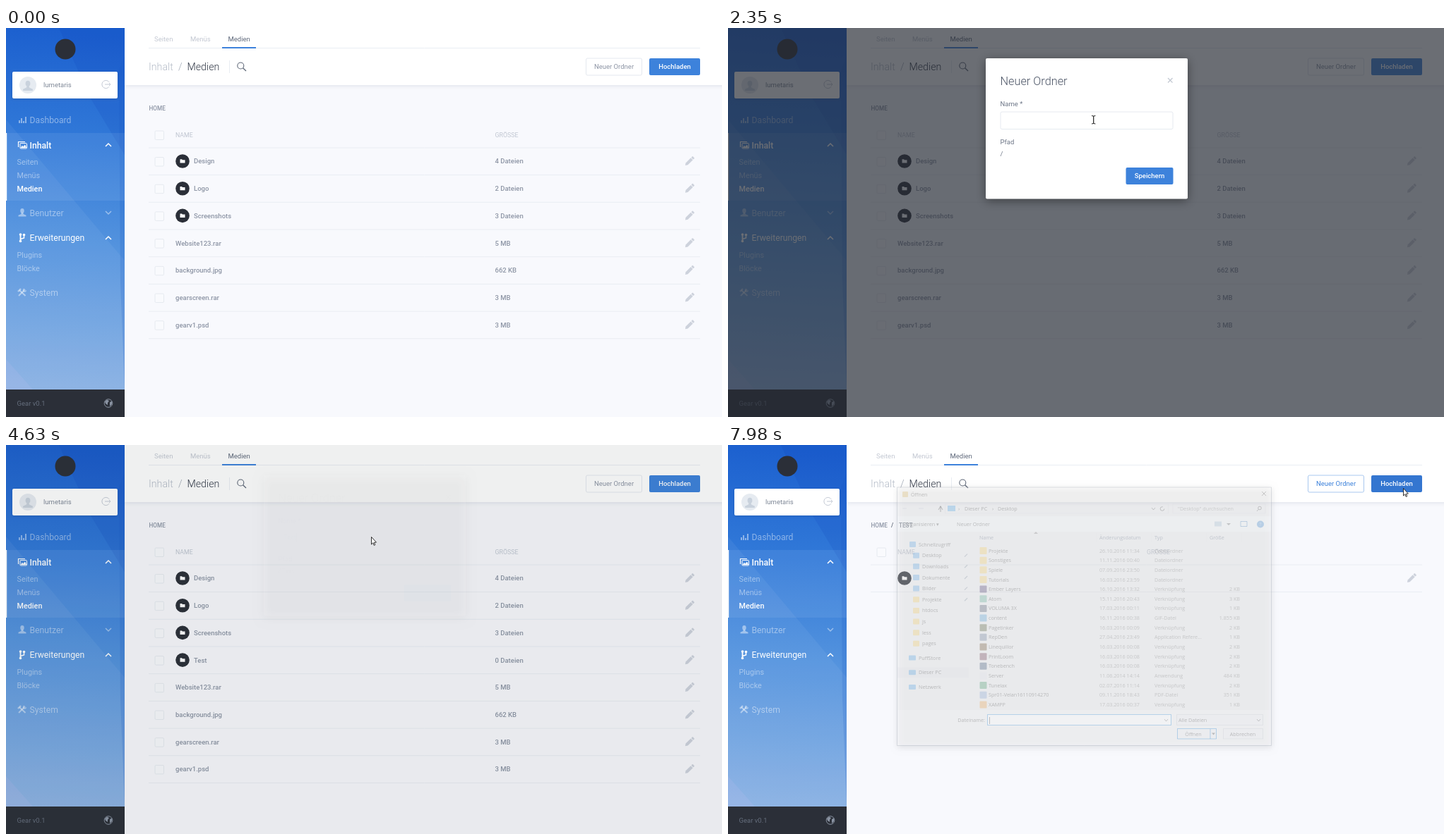
These frames come from a looping animation (1014x552 px, 8 s). An HTML page with a canvas:

```html
<!DOCTYPE html>
<html lang="de">
<head>
<meta charset="utf-8">
<title>Medien</title>
<style>
html, body { margin: 0; width: 100%; height: 100%; overflow: hidden; background: #f8f9fd; }
canvas { display: block; width: 1014px; height: 552px; }
</style>
</head>
<body>
<canvas id="stage"></canvas>
<script>
const W = 1014, H = 552, LOOP = 8000;
const BLUE = '#3d82db', DARK = '#2b2f38', GREY = '#8d95a5', LINE = '#e9edf3', PALE = '#c4cad5';
const canvas = document.getElementById('stage');
const dpr = window.devicePixelRatio || 1;
canvas.width = W * dpr;
canvas.height = H * dpr;
const c = canvas.getContext('2d');

const clamp = v => Math.max(0, Math.min(1, v));
const smooth = u => u * u * (3 - 2 * u);
const quadOut = u => 1 - (1 - u) ** 2;
const cubicOut = u => 1 - (1 - u) ** 3;
const span = (t, a, b) => clamp((t - a) / (b - a));

const STRETCHES = [[140, 780, 9], [1010, 1640, 9], [4470, 4720, 4], [5030, 5410, 6],
  [5570, 6340, 11], [6820, 7590, 11], [7820, 7980, 3]];

function snap(t) {
  let q = 0;
  for (const [a, b, n] of STRETCHES) {
    if (t < a) break;
    const step = (b - a) / (n - 1);
    q = a + Math.min(n - 1, Math.floor((t - a) / step + 0.15)) * step;
  }
  return q;
}

function text(s, x, cy, size, color, weight = 400, align = 'left', font = 'Roboto') {
  c.font = `${weight} ${size}px ${font}, sans-serif`;
  c.textAlign = align;
  c.fillStyle = color;
  c.fillText(s, x, cy + size * 0.36);
}

function box(x, y, w, h, fill, stroke, r = 0) {
  c.beginPath();
  c.roundRect(x, y, w, h, r);
  if (fill) { c.fillStyle = fill; c.fill(); }
  if (stroke) { c.strokeStyle = stroke; c.lineWidth = 1; c.stroke(); }
}

function disc(x, y, r, fill) {
  c.beginPath();
  c.arc(x, y, r, 0, 7);
  c.fillStyle = fill;
  c.fill();
}

function ring(x, y, r, color, width = 1, from = 0, to = 2 * Math.PI) {
  c.beginPath();
  c.arc(x, y, r, from, to);
  c.strokeStyle = color;
  c.lineWidth = width;
  c.stroke();
}

function trace(points) {
  c.beginPath();
  points.forEach(([x, y]) => c.lineTo(x, y));
}

function line(color, width, ...points) {
  trace(points);
  c.strokeStyle = color;
  c.lineWidth = width;
  c.stroke();
}

function poly(color, ...points) {
  trace(points);
  c.fillStyle = color;
  c.fill();
}

function shadowed(color, blur, dy, draw) {
  c.save();
  c.shadowColor = color;
  c.shadowBlur = blur * dpr;
  c.shadowOffsetY = dy * dpr;
  draw();
  c.restore();
}

function person(x, y, k, color) {
  c.beginPath();
  c.ellipse(x, y - 2.6 * k, 2.7 * k, 3.3 * k, 0, 0, 7);
  c.fillStyle = color;
  c.fill();
  poly(color, [x - 1.3 * k, y], [x + 1.3 * k, y], [x + 1.6 * k, y + 2 * k], [x + 5.5 * k, y + 3.8 * k],
    [x + 5.5 * k, y + 5.5 * k], [x - 5.5 * k, y + 5.5 * k], [x - 5.5 * k, y + 3.8 * k], [x - 1.6 * k, y + 2 * k]);
}

function chevron(y, dir, color) {
  line(color, 1.5, [141, y - 2 * dir], [145, y + 2 * dir], [149, y - 2 * dir]);
}

function sidebar() {
  const g = c.createLinearGradient(30, 0, 0, 513);
  g.addColorStop(0, '#1c60cf');
  g.addColorStop(0.3, '#3179d8');
  g.addColorStop(0.6, '#5594de');
  g.addColorStop(1, '#8ab1e2');
  box(0, 0, 168, H, g);
  poly('rgba(15,60,175,.13)', [75, 0], [168, 0], [168, 180], [120, 100]);
  poly('rgba(255,255,255,.05)', [0, 130], [168, 330], [168, 513], [0, 513]);
  poly('rgba(190,190,235,.18)', [0, 470], [38, 513], [0, 513]);
  poly('rgba(25,85,195,.18)', [160, 60], [168, 40], [168, 513], [162, 360]);
  box(0, 149, 168, 96, 'rgba(255,255,255,.07)');
  box(0, 149, 1.2, 96, '#fff');
  disc(84, 30, 14.5, DARK);

  shadowed('rgba(20,50,110,.25)', 4, 1, () => box(9, 62, 149, 38, '#fff', null, 2));
  disc(31, 81, 12, '#e6ebf1');
  person(31, 82, 1.25, '#c9d2dd');
  text('lumetaris', 53, 80.5, 9.5, '#7e8796');
  ring(141.5, 80, 5.6, PALE, 1, 0.6, 5.7);
  line(PALE, 1, [140, 80], [148, 80]);
  line(PALE, 1, [146, 78], [148, 80], [146, 82]);

  const dim = 'rgba(255,255,255,.46)', white = '#fff';
  [[18, 4], [21, 7], [24, 3], [27, 9]].forEach(([x, h]) => box(x, 135 - h, 2, h, dim));
  text('Dashboard', 33.5, 131, 12.2, dim);

  line(white, 1.2, [17.5, 169], [17.5, 161.5], [27, 161.5]);
  box(20, 163.5, 9.5, 7.5, null, white, 1);
  poly(white, [20.5, 170], [23, 167], [24.5, 168.5], [27, 165.5], [29, 170]);
  text('Inhalt', 33.5, 166.5, 12.2, white, 500);
  chevron(166, -1, white);
  text('Seiten', 15.5, 190, 10.8, dim);
  text('Menüs', 15.5, 209, 10.8, dim);
  text('Medien', 15.5, 228, 10.8, white, 500);

  person(23, 262, 1, dim);
  text('Benutzer', 33.5, 262.5, 12.2, dim);
  chevron(262, 1, dim);

  line(white, 1.8, [20.5, 293], [20.5, 303]);
  line(white, 1.5, [20.5, 299.5], [25.5, 298], [25.5, 294]);
  disc(20.5, 293, 1.8, white);
  disc(20.5, 302.5, 1.8, white);
  disc(25.5, 293.5, 1.8, white);
  text('Erweiterungen', 33.5, 298, 12.2, white);
  chevron(298, -1, white);
  text('Plugins', 15.5, 322, 10.8, dim);
  text('Blöcke', 15.5, 341, 10.8, dim);

  line(dim, 2, [18, 380], [27, 371]);
  line(dim, 2, [19, 372], [27.5, 380]);
  line(dim, 2.4, [17, 374], [21, 370]);
  ring(26.5, 372, 2, dim, 1.4, 0.2, 4.4);
  text('System', 33.5, 375.5, 12.2, dim);

  box(0, 513, 168, 39, DARK);
  text('Gear v0.1', 15.5, 533, 9.5, '#656e7d');
  ring(145, 532.5, 5.8, '#8a93a2', 1);
  poly('#8a93a2', [140, 530], [143, 527.5], [146, 529], [144, 532], [144, 535], [141, 533]);
  poly('#8a93a2', [147, 531], [150, 529.5], [150, 534], [147, 537]);
}

function button(label, x, w, y, fill, stroke, color, weight) {
  box(x, y, w, 24, fill, stroke, 2);
  text(label, x + w / 2, y + 11.8, 9.5, color, weight, 'center');
}

function header(t) {
  shadowed('rgba(40,60,100,.13)', 6, 1, () => box(168, -10, 860, 91, '#fff'));
  text('Seiten', 210, 15.5, 9.5, '#c3c8d2');
  text('Menüs', 261, 15.5, 9.5, '#c3c8d2');
  text('Medien', 314.5, 15.5, 9.5, '#606a7c');
  line(LINE, 1, [202, 28.5], [983, 28.5]);
  box(306, 27, 48, 2, BLUE);
  text('Inhalt', 202, 55, 14.2, '#b5bcc8', 300);
  text('/', 244, 55, 14.2, '#a0a8b5', 300);
  text('Medien', 256.5, 55, 14.2, '#333a48', 300);
  line(LINE, 1, [316.5, 46], [316.5, 64]);
  ring(332.3, 53.5, 4.5, '#5f6878', 1.1);
  line('#5f6878', 1.3, [335.6, 56.8], [340, 61]);
  const hot = (t >= 700 && t < 1010) || t >= 7510;
  button('Neuer Ordner', 821.5, 79, 43, '#fff', hot ? '#a9c8ef' : '#e4e8ef', hot ? BLUE : GREY, 400);
  button('Hochladen', 911, 72, 43, t >= 7590 ? '#3476d0' : BLUE, null, '#fff', 500);
}

function checkbox(y) {
  box(211, y - 6, 12.5, 12.5, '#f9fafd', '#e6eaf0', 1.5);
}

function folder(y) {
  disc(250, y, 9.8, DARK);
  poly('#fff', [246.5, y - 2.8], [249, y - 2.8], [250, y - 1.8], [253.5, y - 1.8], [253.5, y + 2.6], [246.5, y + 2.6]);
}

function pencil(y) {
  c.save();
  c.translate(968, y);
  c.rotate(-Math.PI / 4);
  poly('#cdd2dc', [-8.6, 0], [-5.5, -2.1], [4.6, -2.1], [4.6, 2.1], [-5.5, 2.1]);
  box(5.4, -2.1, 2.8, 4.2, '#cdd2dc', null, 1);
  c.restore();
}

const FOLDERS = [['Design', '4 Dateien'], ['Logo', '2 Dateien'], ['Screenshots', '3 Dateien']];
const FILES = [['Website123.rar', '5 MB'], ['background.jpg', '662 KB'], ['gearscreen.rar', '3 MB'], ['gearv1.psd', '3 MB']];

function table(t) {
  const inside = t >= 6570;
  text('HOME', 202.5, 114, 8.2, GREY, 500);
  if (inside) {
    text('/', 231, 114, 8.2, '#555e6e', 500);
    text('TEST', 242, 114, 8.2, '#555e6e', 500);
  }
  checkbox(152);
  text('NAME', 240, 152, 8.8, '#c0c6d1');
  text('GRÖSSE', inside ? 593 : 692.5, 152, 8.8, '#c0c6d1');
  line(LINE, 1, [202, 170], [983, 170]);
  const dirs = t >= 4470 ? [...FOLDERS, ['Test', '0 Dateien']] : FOLDERS;
  const rows = inside ? [['', '']] : [...dirs, ...FILES];
  rows.forEach(([name, size], i) => {
    const y = 189 + i * 38.7;
    const isDir = inside || i < dirs.length;
    if (!inside) checkbox(y + 0.5);
    if (isDir) folder(y);
    text(name, isDir ? 266 : 240, y, 9.5, GREY, 500);
    text(size, 692.5, y, 9.5, GREY, 500);
    pencil(y);
    line(LINE, 1, [202, y + 19.6], [983, y + 19.6]);
  });
}

function notice(q) {
  const shown = cubicOut(span(q, 4990, 5410)) * (1 - smooth(span(q, 7050, 7400)));
  if (!shown) return;
  c.save();
  c.globalAlpha = shown;
  c.translate(0, -21 * (1 - shown));
  box(545.5, 43, 94.5, 24, '#43d854', null, 2);
  text('Ordner hinzugefügt', 592.7, 54.8, 9.5, '#fff', 500, 'center');
  c.restore();
}

const TYPED = [2900, 3050, 3230, 3450];

function modal(t, q) {
  if (q < 1010 || q >= 4710) return;
  const opened = span(q, 1010, 1350);
  const open = cubicOut(opened);
  const left = 1 - smooth(span(q, 4425, 4690));
  c.save();
  c.globalAlpha = 0.68 * quadOut(opened) * left;
  box(0, 0, W, H, '#262a33');
  c.globalAlpha = Math.min(1, open * 1.15) * left;
  c.translate(0, -20 * (1 - open));
  shadowed('rgba(0,0,0,.4)', 14, 3, () => box(365, 43, 286, 199.5, '#fff', null, 2));
  c.globalAlpha *= open * (left < 0.5 ? left : 1);
  text('Neuer Ordner', 385.5, 75.5, 16.3, '#4d5667', 300);
  line('#c3c9d3', 1.2, [623, 71], [629.5, 77.5]);
  line('#c3c9d3', 1.2, [629.5, 71], [623, 77.5]);
  text('Name *', 385.5, 107.5, 9.5, '#6d7687');
  box(386, 119, 244, 24.5, '#fff', '#e6eaf0', 2);
  text('Pfad', 385.5, 161.5, 9.5, '#6d7687');
  text('/', 385.5, 179, 9.5, '#6d7687');
  button('Speichern', 563.5, 67, 198, BLUE, null, '#fff', 500);

  const word = 'Test'.slice(0, TYPED.filter(at => t >= at).length);
  text(word, 390, 179, 9.5, '#c3c9d3');
  text(word, 393, 131, 9.5, '#7b8494');
  const end = 393.5 + c.measureText(word).width;
  const caret = (t >= 1810 && t < 2350) || (t >= 2900 && t < 4000) || t >= 4470;
  if (caret) line('#3a4150', 1, [end, 125], [end, 137]);
  c.restore();
}

const PLACES = ['Schnellzugriff', 'Desktop', 'Downloads', 'Dokumente', 'Bilder', 'Projekte', 'htdocs', 'js', 'less', 'pages'];
const DRIVES = ['PuffStore', 'Dieser PC', 'Netzwerk'];
const LINK = 'Verknüpfung', DIR = 'Dateiordner', SAND = '#f3cc55';
const ENTRIES = [
  ['Projekte', '26.10.2016 11:34', DIR, '', SAND],
  ['Sonstiges', '11.11.2016 00:40', DIR, '', SAND],
  ['Spiele', '07.09.2016 23:50', DIR, '', SAND],
  ['Tutorials', '16.03.2016 23:59', DIR, '', SAND],
  ['Ember Layers', '16.10.2016 13:32', LINK, '2 KB', '#33265e'],
  ['Atom', '15.11.2016 20:43', LINK, '3 KB', '#4fa587'],
  ['VOLUMA 3X', '17.03.2016 00:11', LINK, '1 KB', '#38465e'],
  ['content', '16.11.2016 00:38', 'GIF-Datei', '1.855 KB', '#3e97cf'],
  ['Pagetinker', '16.03.2016 00:09', LINK, '2 KB', '#3b4a1c'],
  ['RepDen', '27.04.2016 23:49', 'Application Refere...', '1 KB', '#58708c'],
  ['Linequillor', '16.03.2016 00:08', LINK, '2 KB', '#573b12'],
  ['PrintLoom', '16.03.2016 00:08', LINK, '2 KB', '#582238'],
  ['Tonebench', '16.03.2016 00:08', LINK, '2 KB', '#1c3f62'],
  ['Server', '11.06.2014 14:14', 'Anwendung', '484 KB', '#dfe3e8'],
  ['Tunelax', '02.07.2016 11:14', LINK, '2 KB', '#2f8f57'],
  ['Spr01-Velan16110914270', '09.11.2016 18:43', 'PDF-Datei', '351 KB', '#7b9fd0'],
  ['XAMPP', '17.03.2016 00:37', LINK, '1 KB', '#e79a3c']];

function filePicker(t, q) {
  if (t < 7820) return;
  const grow = span(q, 7740, 7980);
  const label = (s, x, y, color = '#333', align = 'left') => text(s, x, y, 7.2, color, 400, align, '"Open Sans"');
  c.save();
  c.globalAlpha = 0.27 * grow;
  c.translate(504.5, 243.5);
  c.scale(0.95 + 0.05 * grow, 0.95 + 0.05 * grow);
  c.translate(-504.5, -243.5);
  shadowed('rgba(0,0,0,.35)', 9, 2, () => box(239.5, 60, 530, 366.5, '#fff', '#8d98a6'));
  box(247, 66, 8, 8, '#d9b45c', null, 1);
  label('Öffnen', 259, 70);
  line('#555', 1, [756, 66], [762, 72]);
  line('#555', 1, [762, 66], [756, 72]);
  line('#b8bec7', 1, [253, 90], [247, 90]);
  line('#b8bec7', 1, [270, 90], [277, 90]);
  line('#555', 1.2, [298, 92], [301, 87], [304, 92]);
  line('#555', 1.2, [301, 87], [301, 95]);
  box(307.5, 83.5, 316, 13.5, null, '#d5d9df');
  box(311, 86, 11, 8, '#3d9be0');
  label('›', 326, 90);
  label('Dieser PC', 335, 90);
  label('›', 374, 90);
  label('Desktop', 382, 90);
  line('#555', 1, [600, 89], [602.5, 92], [605, 89]);
  ring(615, 90.5, 2.8, '#555', 1, 0, 5);
  box(630, 83.5, 131, 13.5, null, '#d5d9df');
  label('"Desktop" durchsuchen', 637, 90, '#777');
  ring(753, 89.5, 2.3, '#555');
  line('#555', 1, [751, 91.5], [749, 94]);
  box(240, 101, 529, 22, '#f5f6f9');
  label('Organisieren ▾', 250, 112);
  label('Neuer Ordner', 324, 112);
  box(689, 108.5, 10, 7, '#9db5cc');
  poly('#555', [706, 111], [712, 111], [709, 114]);
  box(726, 108.5, 9, 7, null, '#4479b5');
  disc(754, 112.5, 5, '#2a7ac9');
  text('?', 754, 112.5, 7, '#fff', 700, 'center');
  [['Name', 356], ['Änderungsdatum', 526], ['Typ', 604], ['Größe', 682]].forEach(([s, x]) => label(s, x, 131, '#52617a'));
  [522, 600, 678, 727].forEach(x => line('#e0e3e8', 1, [x, 125], [x, 138]));
  poly('#777', [433, 126], [436, 123], [439, 126]);

  PLACES.forEach((s, i) => {
    const y = 141 + i * 15.65, x = i ? 275 : 270;
    box(x - 13, y - 4, 9, 8, i > 4 ? SAND : '#4c9fe0', null, 1);
    label(s, x, y);
    if (i > 0 && i < 6) line('#789', 1.3, [335, y + 2], [339, y - 2]);
  });
  box(240, 315.5, 101, 15, '#dcdfe4');
  DRIVES.forEach((s, i) => {
    const y = 302 + i * 20.8;
    box(256, y - 3.5, 10, 7, '#3d9be0', null, 1);
    label(s, 270, y);
  });
  ENTRIES.forEach(([name, date, kind, size, tint], i) => {
    const y = 150 + i * 13.65;
    box(356.5, y - 5, 10, 10, tint, null, 1);
    label(name, 369, y);
    label(date, 526, y, '#666');
    label(kind, 604, y, '#666');
    label(size, 725, y, '#666', 'right');
  });

  box(240, 376, 529, 50, '#f2f3f6');
  label('Dateiname:', 364, 390, '#333', 'right');
  box(367.5, 382.5, 260, 15, '#fff', '#1d7ed0');
  line('#333', 1, [370.5, 386], [370.5, 396]);
  line('#555', 1, [618, 389], [620.5, 392], [623, 389]);
  box(635.5, 382.5, 122, 15, '#e7e9ed', '#c4c8ce');
  label('Alle Dateien', 638, 390);
  line('#555', 1, [749, 389], [751.5, 392], [754, 389]);
  box(636.5, 402.5, 55, 14.5, '#e7e9ed', '#1d7ed0');
  line('#1d7ed0', 1, [683, 403], [683, 417]);
  poly('#333', [685, 408.5], [690, 408.5], [687.5, 411.5]);
  label('Öffnen', 659, 410, '#333', 'center');
  box(701.5, 402.5, 56, 14.5, '#e7e9ed', '#c4c8ce');
  label('Abbrechen', 729, 410, '#333', 'center');
  c.restore();
}

function curve([a, b, d], s) {
  const mix = k => (1 - s) ** 2 * a[k] + 2 * s * (1 - s) * b[k] + s * s * d[k];
  return [mix(0), mix(1)];
}

function pointerAt(t, q) {
  if (t >= 7680) return [956, 61];
  if (t >= 6820) return curve([[267, 304], [720, 30], [955, 64]], smooth(span(q, 6780, 7590)));
  if (q >= 5570) return curve([[517, 130], [435, 270], [267, 304]], quadOut(span(q, 5570, 6340)));
  if (q >= 1010) return curve([[858, 67], [687, 98], [517, 130]], smooth(span(q, 1010, 1640)));
  return curve([[948, 536], [925, 190], [858, 62]], smooth(span(q, 140, 780)));
}

function pointerShape(t, q, x, y) {
  const over = (x0, y0, x1, y1) => x >= x0 && x <= x1 && y >= y0 && y <= y1;
  if (q >= 1010 && q < 4600) return over(385, 118, 631, 144) ? 'beam' : 'arrow';
  const onButton = over(821, 43, 901, 67) || over(911, 43, 983, 67);
  const onFolder = q >= 5570 && t < 6570 && over(260, 298, 290, 314);
  return t < 7820 && (onButton || onFolder) ? 'hand' : 'arrow';
}

function pointer(t, q) {
  if (t < 140) return;
  const [x, y] = pointerAt(t, q);
  const shape = pointerShape(t, q, x, y);
  c.save();
  c.translate(x, y);
  if (shape === 'beam') {
    line('#222', 1, [-2, -5.5], [0.7, -5], [3.4, -5.5]);
    line('#222', 1, [-2, 6], [0.7, 5.5], [3.4, 6]);
    line('#222', 1.2, [0.7, -5], [0.7, 5.5]);
  } else {
    trace(shape === 'hand'
      ? [[-1, 0.8], [0, 0], [1, 0.8], [1, 5], [3, 5], [3.4, 5.8], [5, 5.6], [5.6, 6.6], [7.2, 6.8], [7.4, 11],
        [6, 13], [6, 15.5], [-0.5, 15.5], [-0.8, 13.4], [-4, 9], [-3.4, 8], [-1, 9.6]]
      : [[0.5, 0.5], [0.5, 11], [2.8, 8.8], [4.2, 12.4], [5.8, 11.7], [4.3, 8.3], [7.4, 8.1]]);
    c.closePath();
    c.fillStyle = '#fff';
    c.fill();
    c.strokeStyle = '#1b1b1b';
    c.lineWidth = 0.9;
    c.stroke();
  }
  c.restore();
}

function draw() {
  const t = performance.now() % LOOP, q = snap(t);
  c.setTransform(dpr, 0, 0, dpr, 0, 0);
  box(0, 0, W, H, '#f8f9fd');
  header(t);
  table(t);
  sidebar();
  notice(q);
  modal(t, q);
  filePicker(t, q);
  pointer(t, q);
  requestAnimationFrame(draw);
}
draw();
</script>
</body>
</html>
```
